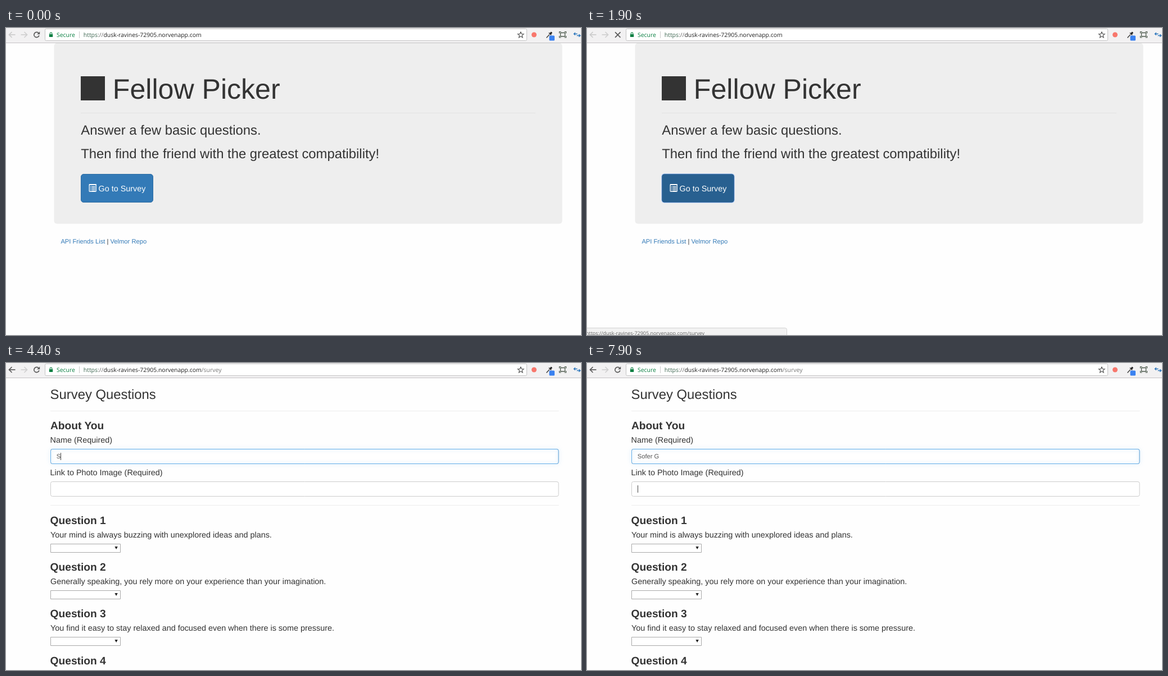
These frames come from a looping animation (1023 px wide and 547 px high, 8000 ms). An HTML page with a canvas:

```html
<!DOCTYPE html>
<html lang="en">
<head>
<meta charset="utf-8">
<title>Survey walkthrough</title>
<style>
html, body { margin: 0; width: 100%; height: 100%; overflow: hidden; background: #fefefe; }
canvas { display: block; width: 1023px; height: 547px; }
</style>
</head>
<body>
<canvas id="stage" width="1023" height="547"></canvas>
<script>
const ctx = document.getElementById('stage').getContext('2d');
const LOOP = 8000;
const SANS = '"Liberation Sans", Arial, sans-serif';
const UI = '"Open Sans", "Noto Sans", sans-serif';
const HOST = 'dusk-ravines-72905.norvenapp.com';
const INK = '#333', LINK = '#337ab7', PAGE = '#fefefe', ICON = '#5a5a5a';
const start = performance.now();

const QUESTIONS = [
  'Your mind is always buzzing with unexplored ideas and plans.',
  'Generally speaking, you rely more on your experience than your imagination.',
  'You find it easy to stay relaxed and focused even when there is some pressure.'
];
const SUGGESTIONS = ['romi4027', 'DORVIN HESAD', 'A', 'TiloKit_DH'];

// [time, typed name, caret visible]
const TYPING = [
  [3000, '', 1], [3400, '', 0], [3900, '', 1],
  [4400, 'S', 1], [4900, 'S', 0],
  [5200, 'So', 1], [5300, 'Sof', 1], [5400, 'Sofe', 1], [5500, 'Sofer', 1],
  [5700, 'Sofer ', 1], [6200, 'Sofer ', 0],
  [6500, 'Sofer G', 1], [7000, 'Sofer G', 0], [7500, 'Sofer G', 1],
  [7900, 'Sofer G', 0]
];

// Draws text on its baseline and returns the x where it ends.
function text(str, x, y, size, color = INK, family = SANS, weight = 400) {
  ctx.font = `${weight} ${size}px ${family}`;
  ctx.fillStyle = color;
  ctx.fillText(str, x, y);
  return x + ctx.measureText(str).width;
}

function rect(x, y, w, h, color) {
  ctx.fillStyle = color;
  ctx.fillRect(x, y, w, h);
}

function box(x, y, w, h, r, fill, stroke, lw = 1) {
  ctx.beginPath();
  ctx.roundRect(x, y, w, h, r);
  if (fill) { ctx.fillStyle = fill; ctx.fill(); }
  if (stroke) { ctx.strokeStyle = stroke; ctx.lineWidth = lw; ctx.stroke(); }
}

function path(points, color, lw, fill) {
  ctx.beginPath();
  points.forEach(([x, y], i) => i ? ctx.lineTo(x, y) : ctx.moveTo(x, y));
  if (fill) { ctx.fillStyle = color; ctx.fill(); return; }
  ctx.strokeStyle = color;
  ctx.lineWidth = lw;
  ctx.stroke();
}

function arrow(tip, y, dir, color, size = 5, len = 11, lw = 1.7) {
  path([[tip, y], [tip - dir * len, y]], color, lw);
  path([[tip - dir * size, y - size], [tip, y], [tip - dir * size, y + size]], color, lw);
}

function reloadIcon() {
  ctx.beginPath();
  ctx.arc(54.5, 12, 4.6, 0.3, Math.PI * 1.75);
  ctx.strokeStyle = ICON;
  ctx.lineWidth = 1.7;
  ctx.stroke();
  path([[60.2, 6.3], [60.2, 11.3], [55.2, 11.3]], ICON, 0, true);
}

function stopIcon() {
  path([[50, 7.3], [59.5, 16.8]], ICON, 1.8);
  path([[59.5, 7.3], [50, 16.8]], ICON, 1.8);
}

function star(cx, cy) {
  const pts = [];
  for (let i = 0; i <= 10; i++) {
    const a = -Math.PI / 2 + i * Math.PI / 5, r = i % 2 ? 2.4 : 5.6;
    pts.push([cx + r * Math.cos(a), cy + r * Math.sin(a)]);
  }
  path(pts, '#4a4a4a', 1.1);
}

function lock(x, y) {
  ctx.beginPath();
  ctx.arc(x, y - 1.6, 2, Math.PI, 0);
  ctx.strokeStyle = '#0b8043';
  ctx.lineWidth = 1.2;
  ctx.stroke();
  rect(x - 3.2, y - 1, 6.4, 5, '#0b8043');
}

function extensionIcons() {
  ctx.beginPath();
  ctx.arc(939.5, 12, 4.5, 0, Math.PI * 2);
  ctx.fillStyle = '#f8776d';
  ctx.fill();
  path([[961.5, 17.5], [967, 11.5]], '#444', 1.5);
  path([[966, 8.5], [970, 12.5]], '#333', 1.7);
  path([[968.3, 10.4], [971, 7.6]], '#222', 3);
  box(966.5, 13.5, 9.5, 9, 1.5, '#3b82f0');
  box(986.5, 8.5, 8, 6.5, 0, null, '#4d5a4d', 1.3);
  for (const [x, y, dx, dy] of [[984.5, 6.5, 1, 1], [996.5, 6.5, -1, 1], [984.5, 17, 1, -1], [996.5, 17, -1, -1]])
    path([[x + dx * 3, y], [x, y], [x, y + dy * 3]], '#4d5a4d', 1.2);
  arrow(1010.5, 10.5, -1, '#2f78bd', 2.3, 6, 1.5);
  arrow(1021.5, 13.5, 1, '#2f78bd', 2.3, 6, 1.5);
}

function toolbar(onSurvey, loading) {
  rect(0, 0, 1023, 26, '#f2f1f2');
  rect(0, 26, 1023, 1, '#c4c2c4');
  arrow(5.5, 12, -1, onSurvey ? ICON : '#cbcbcb');
  arrow(37.5, 12, 1, '#cfcfcf');
  loading ? stopIcon() : reloadIcon();
  box(69.5, 1.5, 857, 21, 2, '#fff', '#c3c2c3');
  lock(80, 12);
  text('Secure', 90, 16, 10.45, '#0b8043', UI);
  rect(130, 6, 1, 12, '#c9c9c9');
  let x = text('https', 137.8, 16, 10.45, '#3d6650', UI);
  x = text('://', x, 16, 10.45, '#666', UI);
  x = text(HOST, x, 16, 10.45, '#222', UI);
  if (onSurvey) text('/survey', x, 16, 10.45, '#777', UI);
  star(915.8, 12.4);
  extensionIcons();
}

function listIcon() {
  box(148.2, 278.7, 12, 12.6, 0.5, null, '#fff', 1.3);
  rect(148, 278, 12.5, 2, '#fff');
  for (let y = 282; y < 290; y += 2.6) {
    rect(150, y, 1.4, 1.3, '#fff');
    rect(152.4, y, 6.3, 1.3, '#fff');
  }
}

function button(t) {
  const hover = t >= 500, focus = t >= 1800, active = focus && t < 1900;
  const fill = active ? '#204d74' : hover ? '#286090' : LINK;
  const edge = active ? '#122b40' : hover ? '#204d74' : '#2e6da4';
  box(133.5, 260.5, 128, 50, 4.5, fill, edge);
  if (focus) box(133, 260, 129, 51, 4, null, 'rgba(110,165,240,.8)');
  listIcon();
  text('Go to Survey', 164.6, 291, 14.35, '#fff');
}

function home(t) {
  box(85.5, 27, 904, 321.7, 5, '#eee');
  rect(133, 86, 43, 43, INK);
  text('Fellow Picker', 189.8, 126, 50.1);
  rect(133, 151, 809, 1, '#e2e2e2');
  text('Answer a few basic questions.', 133.3, 190, 23.82);
  text('Then find the friend with the greatest compatibility!', 133.3, 232, 23.82);
  button(t);
  let x = text('API Friends List', 97.4, 384, 11.2, LINK);
  x = text(' | ', x, 384, 11.2);
  text('Velmor Repo', x, 384, 11.2, LINK);
}

function field(y, focus) {
  box(79.5, y + 0.5, 903.5, 26, 3, '#fff', '#ccc');
  if (!focus) return;
  ctx.save();
  ctx.globalAlpha = focus;
  ctx.shadowColor = 'rgba(102,175,233,.6)';
  ctx.shadowBlur = 6;
  box(79.5, y + 0.5, 903.5, 26, 3, null, '#66afe9');
  ctx.restore();
}

function caret(x, y) {
  rect(x, y, 1, 13, '#444');
}

function nameEntry(t) {
  const state = TYPING.filter(s => s[0] <= t).pop();
  if (!state) return;
  const end = text(state[1], 89.7, 170, 11.2, '#555');
  if (state[2]) caret(Math.max(90, Math.floor(end)), 160);
}

function suggestions(t) {
  const alpha = t < 3100 ? 0.96 : 1;
  box(78.5, 180.5, 906, 77, 0, `rgba(255,255,255,${alpha})`, '#000');
  SUGGESTIONS.forEach((s, i) => text(s, 85.5, 193.3 + i * 19, 9.2, '#000', UI, 700));
}

function question(i) {
  const y = i * 83.2, top = Math.round(322 + y);
  text('Question ' + (i + 1), 78.6, Math.round(287 + y), 19.2, INK, SANS, 700);
  if (!QUESTIONS[i]) return;
  text(QUESTIONS[i], 79, Math.round(311 + y), 14.4);
  box(79.5, top + 0.5, 124, 15, 0, '#fff', '#a9a9a9');
  path([[193.4, top + 5], [198.8, top + 5], [196.1, top + 10]], '#222', 0, true);
}

function survey(t) {
  text('Survey Questions', 78.6, 64, 23.85);
  rect(79, 85, 904.5, 1, '#ededed');
  text('About You', 79, 118, 19.2, INK, SANS, 700);
  text('Name (Required)', 78.6, 142, 14.4);
  field(153, t < 3000 ? 0 : t < 3100 ? 0.6 : 1);
  nameEntry(t);
  text('Link to Photo Image (Required)', 78.6, 200, 14.4);
  field(211, 0);
  if (t >= 7900) caret(90, 218);
  rect(79, 253, 904.5, 1, '#ededed');
  for (let i = 0; i < 4; i++) question(i);
  if (t >= 3000 && t < 4400) suggestions(t);
}

function statusBar(t) {
  const alpha = t < 600 || t >= 2300 ? 0 : t < 700 || t >= 2200 ? 0.5 : 1;
  if (!alpha) return;
  ctx.save();
  ctx.globalAlpha = alpha;
  box(-3.5, 534.5, 359, 20, 3, '#f2f2f2', '#d2d2d2');
  text('https://' + HOST + '/survey', -2, 547, 8.97, '#666', UI);
  ctx.restore();
}

function frame() {
  const t = (performance.now() - start) % LOOP;
  const onSurvey = t >= 2000;
  ctx.textRendering = 'geometricPrecision';
  rect(0, 0, 1023, 547, PAGE);
  onSurvey ? survey(t) : home(t);
  toolbar(onSurvey, t >= 1900 && t < 2000);
  statusBar(t);
  requestAnimationFrame(frame);
}
frame();
</script>
</body>
</html>
```
